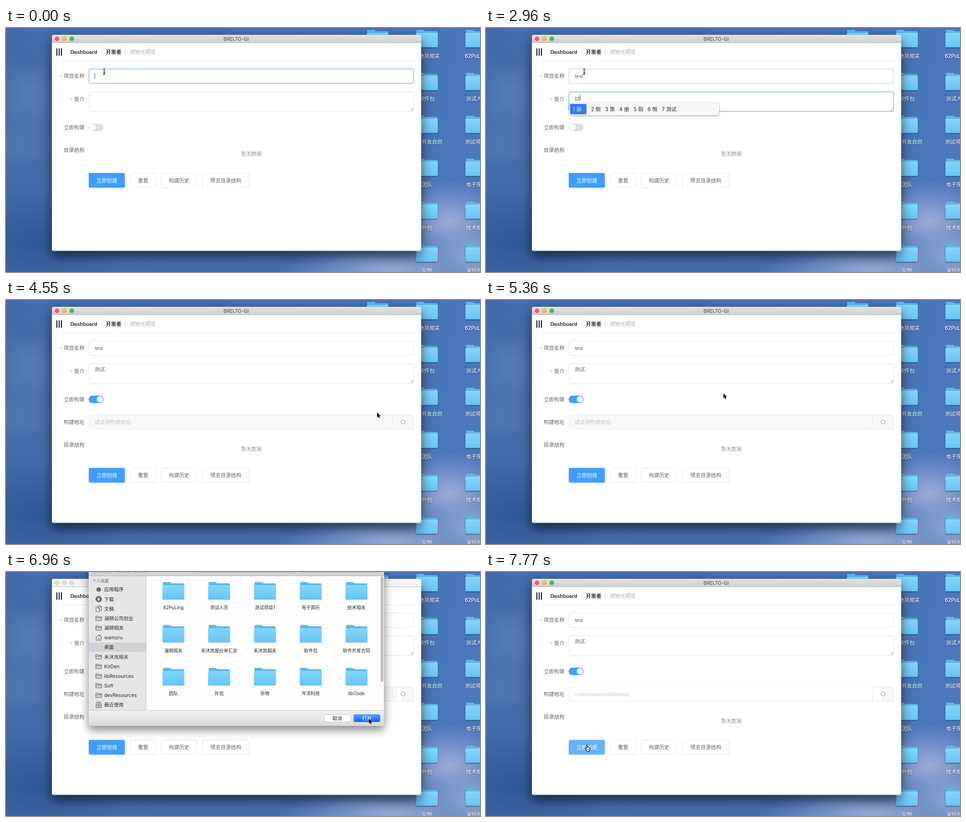
Recreate the animation shown at these times as an HTML page. Size 1043 by 537 pixels, loop 8000 ms.

```html
<!DOCTYPE html>
<html lang="zh-CN">
<head>
<meta charset="utf-8">
<title>Project form</title>
<style>
html, body { margin: 0; width: 100%; height: 100%; overflow: hidden; }
body {
  background:
    radial-gradient(ellipse 130px 90px at 975px 425px, #9aabd4 0, #9aabd400 100%),
    radial-gradient(ellipse 230px 75px at 850px 535px, #93abd3 0, #93abd300 100%),
    radial-gradient(ellipse 90px 60px at 1030px 500px, #8fa5d0 0, #8fa5d000 100%),
    radial-gradient(ellipse 80px 90px at 50px 150px, #6386bba0 0, #6386bb00 100%),
    radial-gradient(ellipse 90px 60px at 30px 255px, #5b80b890 0, #5b80b800 100%),
    radial-gradient(ellipse 220px 120px at 60px 470px, #2d5899 0, #2d589900 100%),
    linear-gradient(100deg, #426ca9 0, #4470b1 60%, #4b79be 100%);
}
svg { position: absolute; left: 0; top: 0; display: block; }
text { font: 11.375px "Liberation Sans", "Noto Sans CJK SC", "Noto Sans CJK", sans-serif; fill: #606266; white-space: pre; }
.mac text { font-family: Inter, "Noto Sans CJK SC", "Noto Sans CJK", sans-serif; fill: #262626; }
.mid { text-anchor: middle; }
.end { text-anchor: end; }
.bold { font-weight: 700; fill: #303133; }
#desk { filter: drop-shadow(0 1px 1px #0008); }
#desk text { fill: #fff; font-weight: 500; }
#files text { font-size: 10px; }
#side text { font-size: 10.7px; }
#side .head { font-size: 9px; font-weight: 500; fill: #707275; }
#frame { filter: drop-shadow(0 12px 13px #0009); }
#dialog { filter: drop-shadow(0 9px 10px #0007); }
#panel { filter: drop-shadow(0 1px 2px #0006); }
.box { fill: #fff; stroke: #dcdfe6; }
.off { fill: #f5f7fa; stroke: #dfe4ed; }
.line { fill: none; stroke: #66686c; stroke-width: 1.1; }
#dialog, #address, #panel, .ptr, .gray { visibility: hidden; }
.sheet #dialog, .sheet .gray, .on #address, .ime #panel, .ptr.live { visibility: visible; }
.sheet #title, .sheet .lights { visibility: hidden; }
.on #lower { transform: translateY(50.5px); }
.on #track { fill: #409eff; }
.on #knob { transform: translateX(16.2px); }
.hot #primary { fill: #66b1ff; }
</style>
</head>
<body>
<svg id="stage" width="1043" height="537" viewBox="0 0 1043 537">
  <defs>
    <linearGradient id="skin" x2="0" y2="1"><stop stop-color="#82d5fa"/><stop offset="1" stop-color="#67c6f5"/></linearGradient>
    <linearGradient id="bar" x2="0" y2="1"><stop stop-color="#e2e2e2"/><stop offset="1" stop-color="#cecece"/></linearGradient>
    <linearGradient id="foot" x2="0" y2="1"><stop stop-color="#f0f0f0"/><stop offset="1" stop-color="#dadada"/></linearGradient>
    <linearGradient id="blue" x2="0" y2="1"><stop stop-color="#55a2fc"/><stop offset="1" stop-color="#0a64fa"/></linearGradient>
    <g id="folder">
      <path d="M1 2.5Q1 .5 3 .5H15.5Q17 .5 18.5 2T21.5 3.5H46Q48 3.5 48 5.5V20H1z" fill="#5cb9e6"/>
      <rect y="8" width="48.5" height="31" rx="1.5" fill="url(#skin)"/>
      <path d="M1 8.5H47.5" stroke="#9be0fc"/>
      <path d="M1 38.5H47.5" stroke="#54b0dc"/>
    </g>
    <g id="small-folder">
      <path d="M-6.5 5V-5H-1.5L0-3.5H6.5V5ZM-6.5-1.5H6.5" fill="#c9cbd0" stroke="#66686c"/>
    </g>
  </defs>

  <g id="desk" class="mac"></g>

  <g id="frame"><rect x="101" y="15" width="812.5" height="475.5" rx="4" fill="#fff"/></g>
  <path d="M101 33V19q0-4 4-4H909.500q4 0 4 4V33Z" fill="url(#bar)"/>
  <path class="gray" d="M101 33V19q0-4 4-4H909.500q4 0 4 4V33Z" fill="#f4f4f4"/>
  <path d="M101 32.500H913.500" stroke="#b9b9b9"/>
  <g class="lights">
    <circle cx="112" cy="23.700" r="4.700" fill="#fc5b54" stroke="#dd4640" stroke-width=".6"/>
    <circle cx="128.300" cy="23.700" r="4.700" fill="#fdbd3e" stroke="#dca034" stroke-width=".6"/>
    <circle cx="144.600" cy="23.700" r="4.700" fill="#34c648" stroke="#27a835" stroke-width=".6"/>
  </g>
  <g class="gray" fill="#dcdcdc" stroke="#c0c0c0" stroke-width=".8">
    <circle cx="112" cy="23.700" r="4.600"/><circle cx="128.300" cy="23.700" r="4.600"/><circle cx="144.600" cy="23.700" r="4.600"/>
  </g>
  <g class="mac"><text id="title" class="mid" x="506.500" y="27.700" style="font-size:10.600px;fill:#484848">BRELTO-QI</text></g>

  <path d="M101 72.500H913.500" stroke="#e6e8ec"/>
  <path d="M112 45V61M117 45V61M122 45V61" stroke="#000" stroke-width="2"/>
  <text class="bold" x="141.500" y="57">Dashboard</text>
  <text x="208.500" y="57" style="fill:#c0c4cc">/</text>
  <text class="bold" x="219.700" y="57">开发者</text>
  <text x="261.500" y="57" style="fill:#c0c4cc">/</text>
  <text x="272.500" y="57" style="fill:#97a8be">初始化项目</text>

  <text x="119.200" y="111" style="fill:#f56c6c">*</text>
  <text class="end" x="172.500" y="110">项目名称</text>
  <rect id="nameBox" class="box" x="182.500" y="90" width="714.500" height="31.700" rx="3"/>
  <text id="name" x="195" y="110"></text>

  <text x="142" y="161.500" style="fill:#f56c6c">*</text>
  <text class="end" x="172.500" y="160.500">简介</text>
  <rect id="noteBox" class="box" x="182.500" y="140.500" width="714.500" height="43" rx="3"/>
  <path d="M890 182L896 176M893.500 182L896 179.500" stroke="#777" stroke-width=".8"/>
  <text id="note" x="195" y="157.300"></text>

  <text class="end" x="172.500" y="222.500">立即构建</text>
  <rect id="track" x="182" y="210.600" width="32.500" height="16.400" rx="8.200" fill="#dcdfe6"/>
  <circle id="knob" cx="190.300" cy="218.800" r="6.700" fill="#fff"/>

  <g id="address">
    <text class="end" x="172.500" y="272.700">构建地址</text>
    <rect class="off" x="182.500" y="252.700" width="714.500" height="31.700" rx="3"/>
    <rect id="field" x="183" y="253.200" width="667.500" height="30.700" fill="#f5f7fa"/>
    <rect id="fade" y="253.200" height="30.700" fill="#fff"/>
    <path d="M850.500 253V284" stroke="#dfe4ed"/>
    <text id="path" x="195" y="272.700" style="fill:#c0c4cc"></text>
    <path d="M875.500 272A4.300 4.300 0 1 1 876.500 271.200L878 272.700" fill="none" stroke="#909399"/>
  </g>

  <g id="lower">
    <text class="end" x="172.500" y="272.700">目录结构</text>
    <text class="mid" x="539.800" y="281" style="fill:#909399">暂无数据</text>
    <rect id="primary" x="182" y="319" width="79.700" height="32.500" rx="3" fill="#409eff"/>
    <rect class="box" x="273.500" y="319.500" width="56" height="31.700" rx="3"/>
    <rect class="box" x="341.500" y="319.500" width="79" height="31.700" rx="3"/>
    <rect class="box" x="432.500" y="319.500" width="102" height="31.700" rx="3"/>
    <g class="mid">
      <text x="221.800" y="339.500" style="fill:#fff">立即创建</text>
      <text x="301.500" y="339.500">重置</text>
      <text x="381" y="339.500">构建历史</text>
      <text x="483.500" y="339.500">预览目录结构</text>
    </g>
  </g>

  <g id="panel" class="mac">
    <rect x="183" y="165" width="330" height="27" rx="3" fill="#f7f7f7"/>
    <rect id="pick" x="185" y="167" height="23" rx="2" fill="#2f7cf6"/>
    <text id="first" x="191" y="182.500" style="fill:#fff"></text>
    <text id="others" y="182.500"></text>
  </g>
  <path id="caret" stroke="#555" stroke-width="1"/>

  <g id="dialog" class="mac">
    <path d="M182-20H832V335q0 3.500-3.500 3.500H185.500q-3.500 0-3.500-3.500Z" fill="#fdfdfd" stroke="#a9a9a9" stroke-width=".6"/>
    <rect x="182" width="650" height="8.500" fill="#d3d3d3"/>
    <path d="M192 .5H230M240 .5H275M280 .5H315M424 .5H635M646 .5H822" stroke="#a8a8a8"/>
    <path d="M182 8.500H832" stroke="#b4b4b4"/>
    <rect x="182" y="9" width="126.500" height="295.500" fill="#e4e6ea"/>
    <rect x="182" y="155.500" width="126.500" height="20" fill="#cfd2d7"/>
    <path d="M308.500 9V304" stroke="#cbccd0"/>
    <g id="side"><text class="head" x="190" y="22.500">个人收藏</text></g>
    <g id="files"></g>
    <rect id="thumb" x="824.300" y="10" width="6" height="232" rx="3" fill="#bdbdbd"/>
    <path d="M182 304.500H832V335q0 3.500-3.500 3.500H185.500q-3.500 0-3.500-3.500Z" fill="url(#foot)"/>
    <path d="M182 304.500H832" stroke="#c6c6c6"/>
    <rect x="700.500" y="313.800" width="57.500" height="16" rx="3" fill="#fff" stroke="#bcbcbc" stroke-width=".8"/>
    <rect x="765.300" y="313.800" width="57.700" height="16" rx="3" fill="url(#blue)" stroke="#1b66dd" stroke-width=".6"/>
    <g class="mid">
      <text x="729" y="325.800" style="font-size:10.600px">取消</text>
      <text x="794" y="325.800" style="font-size:10.600px;fill:#fff">打开</text>
    </g>
  </g>

  <g id="beam" class="ptr" fill="none" stroke-linecap="round">
    <path d="M-2.500-6Q0-6 0-4V4Q0 6-2.500 6M2.500-6Q0-6 0-4M0 4Q0 6 2.500 6M-1.500 1.500H1.500" stroke="#fff" stroke-width="2.600"/>
    <path d="M-2.500-6Q0-6 0-4V4Q0 6-2.500 6M2.500-6Q0-6 0-4M0 4Q0 6 2.500 6M-1.500 1.500H1.500" stroke="#000" stroke-width="1.200"/>
  </g>
  <path id="arrow" class="ptr" d="M.5.5V11.500L3 9.200 4.600 13 6.600 12.200 5 8.500H8.400Z" stroke="#fff" stroke-width="1" paint-order="stroke"/>
  <g id="hand" class="ptr">
    <path d="M3.500 1.600Q3.500.5 4.600.5T5.700 1.600V5Q7.500 4.400 7.700 5.600 9.300 5.100 9.600 6.300 11.300 6 11.300 7.700V10Q11.200 11.500 10 13V14.500H4.600L4 13 .8 8.800Q0 7.400 1.200 7 2 6.800 3.500 8.400Z" fill="#fff" stroke="#000" stroke-width="1.100"/>
    <path d="M6 9.500V12M7.700 9.500V12M9.300 9.500V12" stroke="#000" stroke-width=".7"/>
  </g>
</svg>

<script>
const $ = id => document.getElementById(id);

function add(parent, tag, attrs, text = '') {
  const el = document.createElementNS('http://www.w3.org/2000/svg', tag);
  for (const key in attrs) el.setAttribute(key, attrs[key]);
  el.textContent = text;
  parent.append(el);
}

function addFolder(parent, cx, top, label, baseline) {
  add(parent, 'use', { href: '#folder', x: cx - 24.2, y: top });
  add(parent, 'text', { class: 'mid', x: cx, y: baseline }, label);
}

addFolder($('desk'), 817.5, 3.5, '', 66);
[
  ['禾沐岚相关', '软件包', '软件开发合同', '团队', '外包', '杂物'],
  ['62PuLing', '测试人员', '测试项目1', '电子简历', '技术相关', '澜朔相关']
].forEach((labels, col) => labels.forEach((label, row) => {
  const y = row * 94.4;
  addFolder($('desk'), 926 + col * 109, 3.5 + y, label, 66 + y);
}));

[
  '62PuLing', '测试人员', '测试项目1', '电子简历', '技术相关',
  '澜朔相关', '禾沐岚报价单汇总', '禾沐岚相关', '软件包', '软件开发合同',
  '团队', '外包', '杂物', '岑沛科技', 'libCode'
].forEach((label, i) => {
  const y = Math.floor(i / 5) * 94.5;
  addFolder($('files'), 368.3 + i % 5 * 100.7, 21.5 + y, label, 82.2 + y);
});

// Sidebar icons, drawn around their own centre.
const icons = {
  dot: ['path', { d: 'M-5 0A5 5 0 1 1 5 0A5 5 0 1 1-5 0Z', fill: '#66686c' }],
  down: ['path', { d: 'M-7 0A7 7 0 1 1 7 0A7 7 0 1 1-7 0ZM-1-4V0H-3.500L0 4 3.500 0H1V-4Z', fill: '#66686c', 'fill-rule': 'evenodd' }],
  docs: ['path', { d: 'M-2-3V-6.500H3L6-3.500V4H2M-6-3.500H-1L2-.5V6.500H-6ZM-1-3.500V-.5H2M3-6.500V-3.500H6', class: 'line' }],
  folder: ['use', { href: '#small-folder' }],
  home: ['path', { d: 'M-7 1L0-6 7 1M-5 0V6.500H-1.500V2H1.500V6.500H5V0M4-3V-6', class: 'line' }],
  tray: ['path', { d: 'M-6 1L-4-6H4L6 1V6H-6ZM-6 1H6M-3-3.500H3M-3.500-1.200H3.500M-3 3.500H3', class: 'line' }]
};
[
  ['应用程序', 'dot'], ['下载', 'down'], ['文稿', 'docs'], ['澜朔公司创业', 'folder'],
  ['澜朔相关', 'folder'], ['wamoru', 'home'], ['桌面'], ['禾沐岚相关', 'folder'],
  ['KitDen', 'folder'], ['libResources', 'folder'], ['Soft', 'folder'],
  ['devResources', 'folder'], ['最近使用', 'tray']
].forEach(([label, icon], i) => {
  const y = 38.5 + i * 21.16;
  add($('side'), 'text', { x: 216, y: y + 3.9 }, label);
  if (!icon) return;
  const [tag, attrs] = icons[icon];
  add($('side'), tag, { ...attrs, transform: `translate(204 ${y})` });
});

const BLUE = '#409eff', HOVER = '#c0c4cc', PLAIN = '#dcdfe6';
const LOOP = 8000;

// Each step lists only what changes at its time.
const steps = [
  [0, { name: '', note: '', path: '', nameEdge: BLUE, noteEdge: PLAIN, caret: [195.5, 99], ptr: ['beam', 216, 96], thumb: true }],
  [270, { caret: null }],
  [540, { name: 't', caret: [198.6, 99] }],
  [810, { name: 'te', caret: [205, 99] }],
  [1080, { name: 'tes', caret: [210.8, 99] }],
  [1340, { caret: null }],
  [1880, { name: 'test', caret: [214.5, 99] }],
  [2420, { nameEdge: HOVER, noteEdge: BLUE, caret: [195.5, 146] }],
  [2960, { note: 'ce', ime: ['1 测', '2 侧   3 策   4 册   5 厕   6 恻   7 测试'], caret: [207.5, 146] }],
  [3220, { note: 'ce shi', ime: ['1 测试', '2 侧室   3 策士   4 侧视   5 测   6 侧'], caret: [225.5, 146] }],
  [3490, { note: '测试', ime: null, caret: [218, 146] }],
  [3750, { nameEdge: PLAIN, ptr: ['beam', 212, 172] }],
  [4020, { caret: null, ptr: ['hand', 191, 213.3] }],
  [4290, { noteEdge: PLAIN, on: true }],
  [4550, { ptr: ['arrow', 816, 247] }],
  [4820, { ptr: ['hand', 863, 264] }],
  [5090, { ptr: ['hand', 864, 264] }],
  [5360, { ptr: ['arrow', 522, 205] }],
  [5620, { sheet: true }],
  [5890, { thumb: false, ptr: ['arrow', 660, 265] }],
  [6160, { ptr: ['arrow', 746, 320.5] }],
  [6430, { ptr: ['arrow', 775, 329] }],
  [6690, { ptr: ['arrow', 797.5, 332.5] }],
  [6960, { thumb: true, ptr: ['arrow', 798, 322] }],
  [7230, { sheet: false, path: '/Users/wamoru/Desktop', ptr: ['arrow', 693, 323] }],
  [7500, { ptr: ['arrow', 308, 349] }],
  [7770, { hot: true, ptr: ['hand', 217.5, 380.3] }]
];

function set(id, attrs) {
  for (const key in attrs) $(id).setAttribute(key, attrs[key]);
}

function draw(s) {
  const { classList } = $('stage');
  for (const flag of ['on', 'sheet', 'hot', 'ime']) classList.toggle(flag, !!s[flag]);
  $('name').textContent = s.name;
  $('note').textContent = s.note;
  $('path').textContent = s.path || '请选择构建地址';
  set('note', { 'text-decoration': s.ime ? 'underline' : 'none' });
  set('nameBox', { style: `stroke:${s.nameEdge}` });
  set('noteBox', { style: `stroke:${s.noteEdge}` });
  set('field', { fill: s.path ? '#fff' : '#f5f7fa' });
  set('fade', s.path ? { x: 851, width: 19 } : { x: 862, width: s.sheet ? 8 : 0 });
  set('thumb', { opacity: s.thumb ? 1 : 0 });
  set('caret', { d: s.caret ? `M${s.caret}v13` : '' });
  if (s.ime) {
    const [first, others] = s.ime;
    const width = first.length * 10 + 6;
    $('first').textContent = first;
    $('others').textContent = others;
    set('pick', { width });
    set('others', { x: 195 + width });
  }
  const [kind, x, y] = s.ptr;
  for (const id of ['beam', 'arrow', 'hand']) $(id).classList.toggle('live', id === kind);
  set(kind, { transform: `translate(${x} ${y})` });
}

const start = performance.now();
let shown = -1;

function tick() {
  const t = (performance.now() - start) % LOOP;
  const past = steps.filter(([at]) => at <= t);
  if (past.length !== shown) {
    shown = past.length;
    draw(Object.assign({}, ...past.map(([, change]) => change)));
  }
  requestAnimationFrame(tick);
}
tick();
</script>
</body>
</html>
```
